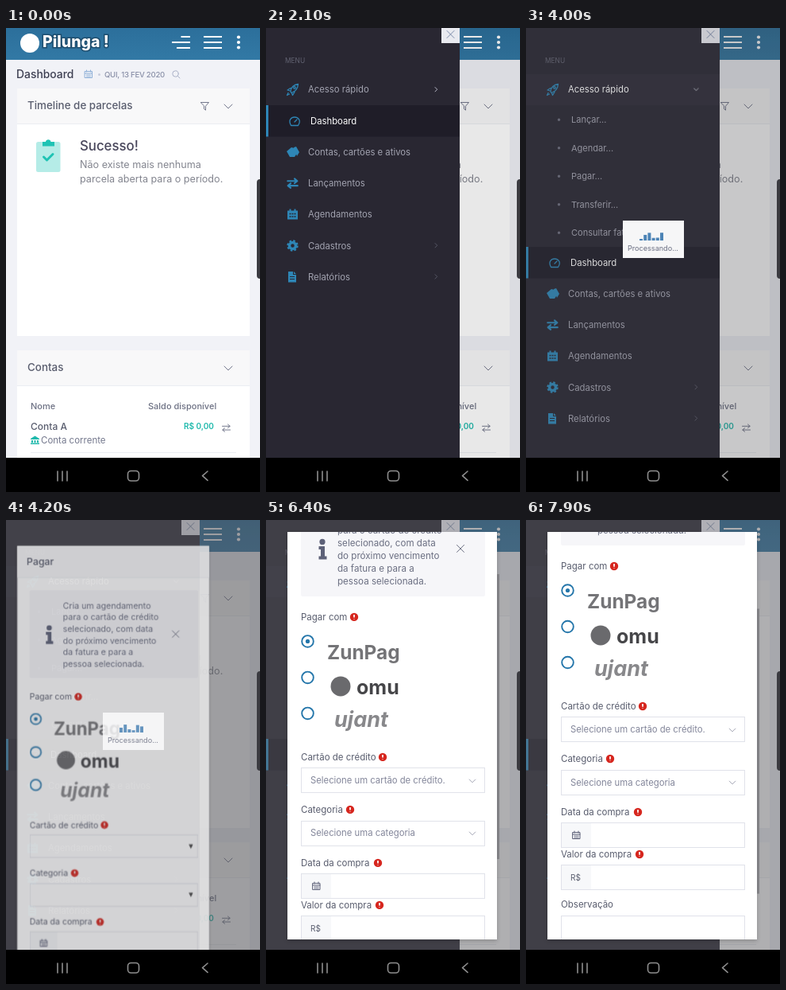
Recreate the animation shown at these times as an HTML page. Size 320 by 583 pixels, loop 8000 ms.

```html
<!DOCTYPE html>
<html lang="pt-BR">
<head>
<meta charset="utf-8">
<title>Dashboard</title>
<style>
html, body { margin: 0; width: 100%; height: 100%; overflow: hidden; background: #000; }
#stage { position: relative; width: 320px; height: 583px; overflow: hidden; background: #f1f2f7; }
#stage > svg { position: absolute; left: 0; top: 0; }
svg { display: block; overflow: visible; font: 11.3px Inter, sans-serif; }
text { white-space: pre; }
.line { fill: none; stroke-linecap: round; stroke-linejoin: round; }
.m { font-weight: 500; }
.anim { animation: 8s linear infinite; }

/* side menu */
.slide { animation-name: slide; --d: 244; }
#close { --d: 229; }
@keyframes slide {
  0%, 14.6% { transform: translateX(calc(var(--d) * -1px)); animation-timing-function: ease; }
  18.4%, 100% { transform: none; }
}
#closeBox { animation-name: appear; animation-timing-function: step-end; }
@keyframes appear { 0% { opacity: 0; } 14.6%, 100% { opacity: 1; } }
.flip { animation-name: flip; animation-timing-function: step-end; }
@keyframes flip { 0% { transform: none; } 14.6%, 100% { transform: translateX(var(--m)); } }
#dim { animation-name: dim; }
@keyframes dim { 0%, 14.6% { opacity: 0; animation-timing-function: ease; } 22.1%, 100% { opacity: .09; } }

/* submenu */
#rest { animation-name: expand; }
@keyframes expand {
  0%, 27.5% { transform: none; animation-timing-function: ease-in-out; }
  31.25%, 100% { transform: translateY(178px); }
}
#quick { animation-name: quick; animation-timing-function: step-end; }
@keyframes quick { 0% { fill: #a2a3b0; } 27.5%, 100% { fill: #fff; } }
#quickRow { animation-name: row; animation-timing-function: step-end; }
@keyframes row { 0% { opacity: 0; } 27.5%, 100% { opacity: 1; } }
#arrow { transform-box: fill-box; transform-origin: center; animation-name: turn; }
@keyframes turn { 0%, 27.5% { transform: none; } 31.25%, 100% { transform: rotate(90deg); } }

/* dialog */
#shade { animation-name: shade; }
@keyframes shade { 0%, 50% { opacity: 0; } 52.5%, 100% { opacity: .42; } }
#modal {
  position: absolute; left: 27px; top: 15px; width: 264px; overflow: hidden;
  background: #fff; box-shadow: 0 2px 5px #0003;
  transform-origin: -27px -15px; animation-name: zoom, fit;
}
@keyframes zoom {
  0%, 50.6% { opacity: 0; transform: translate(-63px, 111px) scale(.5); }
  52.5% { opacity: .92; transform: translate(-10.7px, 18.9px) scale(.915); animation-timing-function: ease-out; }
  55.6%, 100% { opacity: 1; transform: none; }
}
@keyframes fit { 0%, 55.6% { height: 720px; } 57.5%, 100% { height: 512px; } }
.scroll { animation-name: scroll; }
@keyframes scroll {
  0%, 71.25% { transform: none; animation-timing-function: cubic-bezier(.4, 0, .8, .8); }
  80% { transform: translateY(calc(var(--k) * -100px)); animation-timing-function: ease-out; }
  95%, 100% { transform: translateY(calc(var(--k) * -164px)); }
}
#thumb { animation-name: scroll, late; }
.late { animation-name: late; animation-timing-function: step-end; }
.early { animation-name: early; animation-timing-function: step-end; }
@keyframes late { 0%, 57.49% { opacity: 0; } 57.5%, 100% { opacity: 1; } }
@keyframes early { 0%, 57.49% { opacity: 1; } 57.5%, 100% { opacity: 0; } }

/* loader */
#wait { animation-name: wait; }
@keyframes wait {
  0%, 43.75% { opacity: 0; }
  45%, 51.9% { opacity: 1; }
  52.5% { opacity: .85; }
  55%, 100% { opacity: 0; }
}
#bars rect {
  transform-box: fill-box; transform-origin: bottom;
  animation: beat .8s ease-in-out infinite; animation-delay: calc(var(--i) * -.23s);
}
@keyframes beat { 0%, 100% { transform: scaleY(.2); } 50% { transform: none; } }
</style>
</head>
<body>
<div id="stage">
<svg width="320" height="583">
  <defs>
    <linearGradient id="blue" x2="0" y2="1"><stop stop-color="#2c6f9b"/><stop offset="1" stop-color="#3279a5"/></linearGradient>
    <g id="req"><circle r="5.2" fill="#d6261e"/><path d="M0-3V.7M0 2.4V2.9" stroke="#fff" stroke-width="1.7"/></g>
    <path id="down" class="line" d="M-5-2.5 0 2.5 5-2.5"/>
    <path id="cross" class="line" d="M-4.5-4.5 4.5 4.5M4.5-4.5-4.5 4.5"/>
    <g id="cal" class="line"><path d="M-4.5-3.5h9v8h-9zM-4.5-1h9M-2.5-5v2M2.5-5v2"/><path d="M-2.5 1h5M-2.5 3h5" stroke-dasharray="1 1"/></g>
    <g id="swap" class="line"><path d="M-5-2.2H4.5M2-4.5 4.7-2.2 2 0M5 2.5H-4.5M-2 .2-4.7 2.5-2 4.7"/></g>
  </defs>

  <rect width="320" height="40" fill="url(#blue)"/>
  <circle cx="30" cy="19" r="12" fill="#fff"/>
  <text x="46" y="24" font-size="19.5" font-weight="800" fill="#fff" stroke="#1d4d6e" stroke-width="3" paint-order="stroke">Pilunga !</text>
  <g fill="#fff">
    <rect class="anim flip" style="--m:-11.5px" x="220.5" y="10" width="11.5" height="2"/>
    <rect x="209" y="17" width="23" height="2"/>
    <rect class="anim flip" style="--m:-6px" x="215" y="24" width="17" height="2"/>
    <path d="M249 10h23v2h-23zM249 17h23v2h-23zM249 24h23v2h-23z"/>
    <circle cx="293" cy="11.5" r="2.1"/><circle cx="293" cy="18" r="2.1"/><circle cx="293" cy="24.5" r="2.1"/>
  </g>

  <text class="m" x="13" y="62.5" font-size="13.9" fill="#3d3f52">Dashboard</text>
  <use href="#cal" x="104" y="58" stroke="#8fb0d8"/>
  <circle cx="117.500" cy="58.500" r="1.500" fill="#c9cddd"/>
  <text class="m" x="124" y="62" font-size="9.600" letter-spacing="-.25" fill="#8a90a8">QUI, 13 FEV 2020</text>
  <path class="line" d="M216.500 60.500 219 63M217.200 57.500a3.700 3.700 0 1 1-7.400 0a3.700 3.700 0 1 1 7.400 0" stroke="#a9b0c6"/>

  <rect x="14" y="76" width="293" height="311" fill="#fff"/>
  <rect x="14" y="76" width="293" height="44" fill="#f8f8f9"/>
  <path d="M14 120.500H307" stroke="#ebedf2"/>
  <text class="m" x="27" y="102" font-size="13.400" fill="#595d6e">Timeline de parcelas</text>
  <path class="line" d="M245.500 93.500h10l-4 4.700v5l-2-1.500v-3.500z" stroke="#74788d"/>
  <use href="#down" x="280" y="98.500" stroke="#74788d"/>
  <rect x="38" y="143" width="30.500" height="38" rx="2.500" fill="#b5ece7"/>
  <path d="M46 143h4a3.300 3.300 0 0 1 6.500 0h4.500v5.500H46z" fill="#1fc3b4"/>
  <path class="line" d="M47.500 162l4 4 7.500-7.500" stroke="#1fc3b4" stroke-width="3"/>
  <text class="m" x="93" y="154" font-size="16.800" fill="#48465b">Sucesso!</text>
  <g font-size="12.600" fill="#83858f"><text x="93" y="176">Não existe mais nenhuma</text><text x="93" y="194">parcela aberta para o período.</text></g>

  <rect x="14" y="405" width="293" height="135" fill="#fff"/>
  <rect x="14" y="405" width="293" height="44" fill="#f8f8f9"/>
  <path d="M14 449.500H307M31 533.500H290" stroke="#ebedf2"/>
  <text class="m" x="27" y="431" font-size="13.400" fill="#595d6e">Contas</text>
  <use href="#down" x="280" y="427.500" stroke="#74788d"/>
  <g class="m" fill="#6c7083" font-size="11">
    <text x="31" y="479">Nome</text><text x="179" y="479">Saldo disponível</text>
    <text x="31" y="505" font-size="12" fill="#595d6e">Conta A</text>
    <text x="224" y="504" font-size="10" font-weight="600" fill="#1fb9ac">R$ 0,00</text>
  </g>
  <use href="#swap" x="277.500" y="502.500" stroke="#74788d"/>
  <path d="M31 516 36.500 512.500 42 516v1H31zM32 518h2v3h-2zM35.500 518h2v3h-2zM39 518h2v3h-2zM31 521.500h11v1.500H31z" fill="#1fb9ac"/>
  <text x="44" y="521.500" font-size="11.500" fill="#74788d">Conta corrente</text>

  <rect id="dim" class="anim" width="320" height="540"/>

  <g class="anim slide" fill="#a2a3b0">
    <rect width="244" height="540" fill="#292732"/>
    <text x="24" y="43.500" font-size="8.400" fill="#626372">MENU</text>
    <rect id="quickRow" class="anim" y="58" width="244" height="39" fill="#2d2b37"/>
    <g class="line" stroke="#2e86b6" stroke-width="1.300">
      <path d="M31 80c0-5 4-9 9.500-9.500C40 76 37 80 32 81.500zM31 75.500l-4 2.500 3.500 1M36 80.500l-2.500 4-1-3M28 81.500l-1.500 3 3-1.500"/><circle cx="36" cy="75" r="1.300"/>
    </g>
    <text id="quick" class="anim" x="53" y="81">Acesso rápido</text>
    <path id="arrow" class="anim line" d="M213 74.500l2.700 2.700-2.700 2.700" stroke="#b5b6c4"/>
    <g font-size="11">
      <text x="57" y="119">Lançar...</text><text x="57" y="154.500">Agendar...</text><text x="57" y="190">Pagar...</text>
      <text x="57" y="225.500">Transferir...</text><text x="57" y="261">Consultar fatura...</text>
      <path class="line" d="M41.500 115.200v.01M41.500 150.700v.01M41.500 186.200v.01M41.500 221.700v.01M41.500 257.200v.01" stroke="#6b6c7c" stroke-width="3.500"/>
    </g>
    <g id="rest" class="anim">
      <rect y="97" width="244" height="460" fill="#292732"/>
      <rect y="97" width="244" height="39.500" fill="#1f1d28"/>
      <rect y="97" width="3" height="39.500" fill="#2e86b6"/>
      <g class="line" stroke="#2e86b6" stroke-width="1.300">
        <path d="M31.500 122.500c-4-7 .5-10.500 4.500-10.500s9 3.500 4.500 10.500zM36 118l3-3"/>
      </g>
      <g fill="#2e86b6">
        <path d="M26 155l6-5 4 1 4 5-4 6H30zM35 150l3-1 4 7-3 5z"/>
        <g fill="none" stroke="#2e86b6" stroke-width="1.700"><use href="#swap" transform="translate(33.500 195) scale(1.250)"/></g>
        <path d="M27 229.500h13v11H27zM29.500 227.500h2v3h-2zM35.500 227.500h2v3h-2z"/>
        <path d="M29.500 233.500h2M32.500 233.500h2M35.500 233.500h2M29.500 237h2M32.500 237h2M35.500 237h2" stroke="#292732" stroke-width="1.600"/>
        <circle cx="33.500" cy="273.500" r="4" fill="none" stroke="#2e86b6" stroke-width="3.500"/>
        <circle cx="33.500" cy="273.500" r="6.200" fill="none" stroke="#2e86b6" stroke-width="2" stroke-dasharray="2.600 2.270"/>
        <path d="M28 306h6v4h4v9.500H28zM35 306l3 3h-3z"/>
        <path d="M30 312.500h6M30 315.500h6" stroke="#292732"/>
      </g>
      <text x="56" y="121" fill="#fff">Dashboard</text>
      <text x="53" y="160">Contas, cartões e ativos</text><text x="53" y="199">Lançamentos</text>
      <text x="53" y="238">Agendamentos</text><text x="53" y="277.500">Cadastros</text><text x="53" y="316.500">Relatórios</text>
      <path class="line" d="M213 270.500l2.700 2.700-2.700 2.700M213 309.700l2.700 2.700-2.700 2.700" stroke="#565765"/>
    </g>
  </g>
  <g id="closeBox" class="anim"><g id="close" class="anim slide">
    <rect x="221" width="23" height="19" fill="#e9eaf0"/><use href="#cross" x="232.500" y="8" stroke="#7d8cab"/>
  </g></g>
  <rect id="shade" class="anim" width="320" height="540" fill="#606064"/>
  <rect id="thumb" class="anim" style="--k:-.68" x="291" y="0" width="3" height="358" fill="#88888c"/>
</svg>

<div id="modal" class="anim">
<svg width="264" height="720" viewBox="27 15 264 720">
  <g class="anim scroll" style="--k:1" fill="#595d6e">
    <rect x="27" y="15" width="264" height="43" fill="#f9f9fa"/>
    <path d="M27 58.500H291" stroke="#ebedf2"/>
    <text class="m" x="40" y="41" font-size="13.500">Pagar</text>

    <rect x="44" y="76" width="232" height="120" rx="2" fill="#f6f6f9"/>
    <circle cx="71" cy="127.500" r="3.600" fill="#5d6178"/>
    <path d="M66.500 133h7.500v12.500h2.500v4h-10v-4H69V137h-2.500z" fill="#5d6178"/>
    <g font-size="11.600" fill="#6b6f82">
      <text x="90" y="101">Cria um agendamento</text><text x="90" y="117">para o cartão de crédito</text>
      <text x="90" y="133">selecionado, com data</text><text x="90" y="149">do próximo vencimento</text>
      <text x="90" y="165">da fatura e para a</text><text x="90" y="181">pessoa selecionada.</text>
    </g>
    <use href="#cross" x="245" y="136" stroke="#6b6f82"/>

    <g font-size="11.500">
      <text x="44" y="226">Pagar com</text><use href="#req" x="111" y="222"/>
      <text x="44" y="402">Cartão de crédito</text><use href="#req" x="147" y="398"/>
      <text x="44" y="468">Categoria</text><use href="#req" x="106" y="464"/>
      <text x="44" y="535">Data da compra</text><use href="#req" x="141" y="531"/>
      <text x="44" y="588">Valor da compra</text><use href="#req" x="143" y="584"/>
      <text x="44" y="651">Observação</text>
    </g>

    <g fill="none" stroke="#2476aa" stroke-width="1.900">
      <circle cx="52.500" cy="252.500" r="7.300"/><circle cx="52.500" cy="298" r="7.300"/><circle cx="52.500" cy="343" r="7.300"/>
    </g>
    <circle cx="52.500" cy="252.500" r="2.600" fill="#2476aa"/>
    <g font-weight="700">
      <text x="77" y="275" font-size="24.400" fill="#747477">ZunPag</text>
      <circle cx="94" cy="309" r="12.500" fill="#6a6a6d"/>
      <text x="114" y="319" font-size="25" fill="#464649">omu</text>
      <text x="86" y="360" font-size="27" font-style="italic" fill="#88888b">ujant</text>
    </g>

    <g fill="#f7f8fa"><rect x="45" y="545" width="37" height="30"/><rect x="45" y="598" width="37" height="30"/></g>
    <g fill="none" stroke="#e0e2ea">
      <rect x="44.500" y="411.500" width="231" height="31"/><rect x="44.500" y="478.500" width="231" height="31"/>
      <rect x="44.500" y="544.500" width="231" height="31"/><rect x="44.500" y="597.500" width="231" height="31"/>
      <rect x="44.500" y="661.500" width="231" height="60"/>
    </g>
    <g class="anim early" fill="#444"><path d="M263 424.500h6l-3 6zM263 491h6l-3 6z"/></g>
    <g class="anim late" fill="#83869a">
      <text x="56" y="431">Selecione um cartão de crédito.</text><text x="56" y="497.500">Selecione uma categoria</text>
      <g stroke="#83869a"><use href="#down" transform="translate(260 428) scale(.75)"/><use href="#down" transform="translate(260 494) scale(.75)"/></g>
    </g>
    <use href="#cal" x="63.500" y="560" stroke="#5d6178"/>
    <text x="56" y="617" font-size="10">R$</text>
  </g>
</svg>
</div>

<svg width="320" height="583">
  <g id="wait" class="anim">
    <rect width="320" height="540" fill="#505054" opacity=".2"/>
    <rect x="122" y="242" width="77" height="47" fill="#f6f6f7"/>
    <g id="bars" fill="#4d84b6">
      <rect style="--i:0" x="143" y="257" width="4" height="10"/><rect style="--i:1" x="148.200" y="257" width="4" height="10"/>
      <rect style="--i:2" x="153.400" y="257" width="4" height="10"/><rect style="--i:3" x="158.600" y="257" width="4" height="10"/>
      <rect style="--i:4" x="163.800" y="257" width="4" height="10"/><rect style="--i:5" x="169" y="257" width="4" height="10"/>
    </g>
    <text x="160" y="280" font-size="9.100" text-anchor="middle" fill="#6b6f82">Processando...</text>
  </g>
  <rect x="316" y="190" width="10" height="125" rx="4" fill="#3b3b41"/>
  <rect y="540" width="320" height="43"/>
  <g class="line" stroke="#8e8e8e" stroke-width="1.600">
    <path d="M65 557v12M71 557v12M77 557v12M254 557l-6.500 5.700 6.500 5.700"/>
    <rect x="153.500" y="556.500" width="14" height="12.500" rx="4"/>
  </g>
</svg>
</div>
</body>
</html>
```
